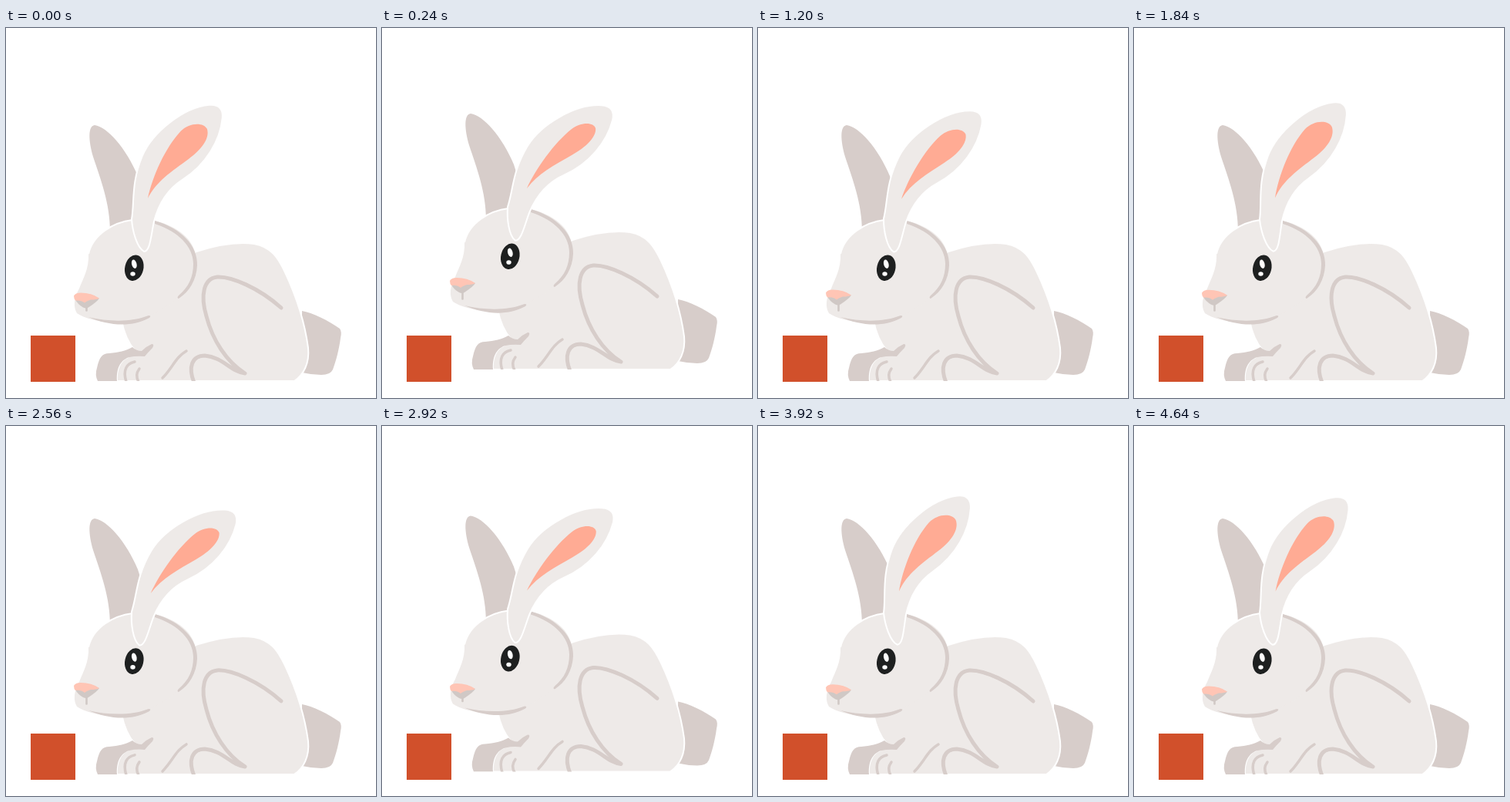
Recreate the animation shown at these times as an HTML page. Size 480 px wide and 480 px high, loop 4.88 s.

```html
<!DOCTYPE html>
<html lang="en">
<head>
<meta charset="utf-8">
<title>Rabbit</title>
<style>
  html, body { margin: 0; width: 100%; height: 100%; overflow: hidden; background: #fff; }
  svg { display: block; width: 100%; height: 100%; }
  .fur { fill: #eeeae8; }
  .shade { fill: #d7cdca; }
  .rim { stroke: #fff; stroke-width: 2; stroke-linejoin: round; }
  .line { fill: none; stroke: #d7cdca; stroke-width: 5; stroke-linecap: round; stroke-linejoin: round; }
  .thin { stroke-width: 3.5; }
</style>
</head>
<body>
<svg viewBox="0 0 480 480">
  <rect x="32" y="399" width="58" height="60" fill="#d1502b"/>
  <g id="rabbit">
    <path class="shade" d="M384 367C397 369 419 380 433 390Q436 394 434 402C432 418 428 432 424 443Q421 450 409 450Q397 450 384 447Z"/>
    <path class="shade" d="M135 264C135 228 123 197 113 167C107 146 106 127 115 126C131 128 156 156 171 192Q176 206 179 230L166 258Z"/>

    <path class="fur rim" d="M150 380C153 395 158 408 167 418L158 427C148 431 143 443 144 458H374C386 450 394 435 392 415C388 385 377 349 362 317C353 298 344 284 322 280C300 277 272 282 247 290L180 330Z"/>
    <path class="shade" d="M119 458Q115 450 118 441C121 427 125 422 134 422C146 421 155 419 164 414Q169 419 176 419Q182 413 189 410Q193 410 190 415Q184 421 180 426Q169 425 160 427C147 431 143 444 144 458Z"/>
    <path class="line thin" d="M156 459C151 443 157 435 167 433M172 459C168 452 170 446 173 442"/>
    <path class="line thin" d="M234 419C220 427 216 441 203 454"/>
    <path class="line" d="M357 363C328 337 292 322 274 323C256 325 252 347 260 374C268 405 286 433 310 448C292 446 281 427 258 425C241 425 236 440 244 460"/>
    <path fill="#fff" d="M100 458H374V464H100Z"/>

    <path class="fur" d="M164 249C140 252 113 267 107 293C108 312 100 325 95 338C88 350 87 362 92 370C107 381 151 388 187 373C224 355 247 333 247 302C246 274 222 257 193 250Z"/>
    <path d="M164 249C140 252 113 267 107 293" fill="none" stroke="#fff" stroke-width="2"/>
    <path class="shade" d="M193 250C228 260 249 283 248 308C247 327 238 342 224 351Q221 350 224 347C237 336 243 323 243 306C243 284 224 264 193 254Z"/>
    <path class="shade" d="M107 375C133 381 162 382 185 373Q189 373 186 376C163 389 132 386 107 375Z"/>

    <g id="ear">
      <path class="fur rim" d="M179 290C170 285 164 264 163 248C167 225 162 202 177 166C190 136 230 103 264 100C277 99 282 106 281 117C278 146 260 177 229 197C207 211 197 232 192 251C188 269 187 290 179 290Z"/>
      <path id="inner" fill="#ffab94" d="M184 221C190 193 207 155 227 134C238 123 256 122 261 131C265 143 254 158 237 170C215 186 195 199 184 221Z"/>
    </g>

    <ellipse cx="166.3" cy="311.2" rx="12" ry="17" fill="#1e2020" transform="rotate(13 166.3 311.2)"/>
    <ellipse cx="166.3" cy="306.2" rx="3.2" ry="5.8" fill="#fff" transform="rotate(-14 166.3 306.2)"/>
    <ellipse cx="164.5" cy="319" rx="3.2" ry="2.8" fill="#fff"/>

    <path class="line" style="stroke-width:2.6;stroke:#d0c8c5" d="M104.5 352V366.5"/>
    <g id="nose">
      <path fill="#d0c8c5" d="M90 352Q104 346 121 350Q119 354 107 362Q104 364 100 362Q93 358 90 352Z"/>
      <path fill="#ffc5b5" d="M88 347Q90 343 97 343Q111 343 121 350Q117 352 110 352Q104 354 102 356Q97 352 90 353Q88 351 88 347Z"/>
    </g>
  </g>
</svg>
<script>
const LOOP = 4880, STEP = 40, LAST = 4640;
const FLICK = 2336;          // time between two ear flicks
const DROP = 11, LEAN = 2.2; // full ear swing, and the angle it is drawn at
const [rabbit, ear, inner, nose] = ['rabbit', 'ear', 'inner', 'nose'].map(id => document.getElementById(id));

const part = (t, start, span) => Math.min(1, Math.max(0, (t - start) / span));
const ease = (...span) => (1 - Math.cos(Math.PI * part(...span))) / 2;
const bump = (...span) => Math.sin(Math.PI * part(...span)) ** 2;

// the ear drops, rests, then rises again
function earAngle(t) {
  const u = (t + 115) % FLICK;
  return DROP * (ease(u, 0, 400) - ease(u, 1155, 360));
}

// two hops, the second lands a little higher
const hop = t => -15 * (bump(t, 20, 460) + bump(t, 2440, 580)) - 6 * ease(t, 2440, 580);

// quick sniffs, slower after the second flick
function sniff(t) {
  const turns = t < 2430 ? t / 505 : (LAST - t) / 580;
  return -1.8 + 2.4 * Math.cos(2 * Math.PI * turns);
}

function draw(ms) {
  const t = Math.min(LAST, Math.floor((ms % LOOP) / STEP) * STEP);
  const tilt = earAngle(t) - LEAN;
  rabbit.setAttribute('transform', `translate(0 ${hop(t)})`);
  ear.setAttribute('transform', `rotate(${tilt} 172 248)`);
  // the pink part narrows across its length as the ear drops
  inner.setAttribute('transform',
    `translate(184 221) rotate(-50) scale(1 ${1 - 0.02 * tilt}) rotate(50) translate(-184 -221)`);
  nose.setAttribute('transform', `translate(0 ${sniff(t)})`);
}

const start = performance.now();
function tick() {
  draw(performance.now() - start);
  requestAnimationFrame(tick);
}
tick();
</script>
</body>
</html>
```
